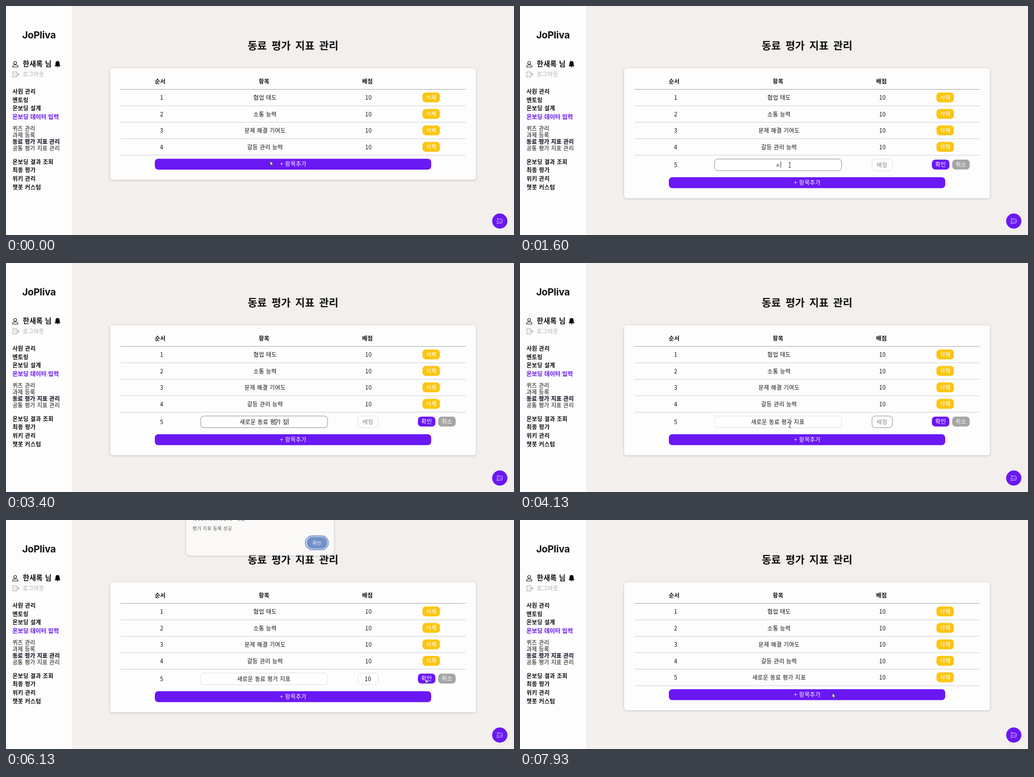
Animation of 1000 by 452 pixels, one loop 8 s. Source, as an HTML page:

```html
<!DOCTYPE html>
<html lang="ko">
<head>
<meta charset="utf-8">
<style>
  html, body { margin: 0; width: 100%; height: 100%; overflow: hidden; background: #f2efec; }
  svg { display: block; width: 1000px; height: 452px; }
  text { font: 11.2px "Noto Sans CJK KR", "Noto Sans CJK", sans-serif; letter-spacing: .3px; fill: #111; }
  .mid { text-anchor: middle; }
  .bold { font-weight: 700; }
  .sub { font-size: 11px; }
  .title { font-size: 20.5px; letter-spacing: 0; word-spacing: 3.5px; }
  .logo { font: 700 19px Inter, sans-serif; letter-spacing: -.2px; }
  .user { font-size: 14px; }
  .purple { fill: #6a18f4; }
  .white { fill: #fff; }
  .gray { fill: #888; }
  .pale { fill: #aaa; }
  .small { font-size: 9.4px; letter-spacing: .1px; }
  .card { filter: drop-shadow(0 1.5px 2px #0003); }
  .line { fill: none; stroke: #222; stroke-width: 1.2; stroke-linejoin: round; stroke-linecap: round; }
</style>
</head>
<body>
<svg id="stage" viewBox="0 0 1000 452"></svg>
<script>
const LOOP = 8000;
const ADD = 250, FOCUS = 600, TYPE = 1545, KEY = 83.5, TAB = 4000;
const OPEN = 6050, CLOSE = 7140, SAVE = 7250;

// Successive states of the Korean input method, one per key press
const typed = (() => {
  const words = [
    ['ㅅ', '새', '샐', '새로', '새롱', '새로우', '새로운'],
    ['ㄷ', '도', '동', '동ㄹ', '동료'],
    ['ㅍ', '펴', '평', '평ㄱ', '평가'],
    ['ㅈ', '지', '짚', '지표']
  ];
  const states = [''];
  let done = '';
  for (const steps of words) {
    if (done) states.push(done += '\u00a0');
    for (const step of steps) states.push(done + step);
    done += steps.at(-1);
  }
  return states;
})();

// Pointer stops: time, x, y
const stops = [
  [0, 520, 306], [350, 520, 306], [600, 523, 320], [1000, 523, 320],
  [1400, 531, 314], [3600, 531, 314], [4200, 531, 320], [5050, 531, 320],
  [5300, 640, 350], [5650, 826, 314], [6150, 826, 314], [6750, 621, 44],
  [7170, 621, 44], [7700, 615, 342], [LOOP, 615, 342]
];

const text = (x, y, s, cls = '', attrs = '') =>
  `<text x="${x}" y="${y + 4.2}" class="${cls}" ${attrs}>${s}</text>`;
const box = (x, y, w, h, r, fill, attrs = '') =>
  `<rect x="${x}" y="${y}" width="${w}" height="${h}" rx="${r}" fill="${fill}" ${attrs}/>`;
const rule = (y, color) => box(225, y, 680, 1, 0, color);
const button = (x, y, label, fill) =>
  box(x - .2, y - 9.7, 34.4, 19.4, 6.5, fill) + text(x + 17, y, label, 'mid white');
const row = (i, name) => {
  const y = 181 + 32.5 * i;
  return text(306.5, y, i + 1, 'mid') + text(510, y, name, 'mid') + text(713.5, y, 10, 'mid') +
    button(820, y - .5, '삭제', '#fdc50f') + rule(y + 15.5, '#cfcfcf');
};
const input = (id, x, w) =>
  box(x + .5, 302, w, 23, 6.5, '#fff', `id="${id}Box"`) +
  text(x + w / 2, 313.5, '', 'mid', `id="${id}"`);

const menu = [
  [169, '사원 관리', 'bold'], [186, '멘토링', 'bold'], [202, '온보딩 설계', 'bold'],
  [219, '온보딩 데이터 입력', 'bold purple'], [241.5, '퀴즈 관리', 'sub'], [254.5, '과제 등록', 'sub'],
  [267.5, '동료 평가 지표 관리', 'bold sub'], [280.5, '공통 평가 지표 관리', 'sub'],
  [308, '온보딩 결과 조회', 'bold'], [324, '최종 평가', 'bold'],
  [340.5, '위키 관리', 'bold'], [357.5, '챗봇 커스텀', 'bold']
];

const sidebar =
  box(0, 0, 130, 452, 0, '#fefdfe') +
  text(65, 59.5, 'JoPliva', 'mid logo') +
  `<g class="line"><circle cx="18" cy="112.3" r="2.8"/><path d="M13 120.5q0-4 3.5-4h3.5q3.5 0 3.5 4z"/></g>` +
  text(33, 115, '한새록 님', 'bold user') +
  `<path d="M101.5 108.5c-3.5 0-4 3-4 5.5s-.6 3.8-1.8 5h11.6c-1.2-1.2-1.8-2.5-1.8-5s-.5-5.5-4-5.5zM99.8 119.8a1.8 1.8 0 0 0 3.5 0z"/>` +
  `<path class="line" style="stroke:#aaa" d="M21 132.5V130.2H13.5V139.8H21V137.5M17.5 135H25.5M23 132.5L25.5 135L23 137.5"/>` +
  text(33, 135, '로그아웃', 'pale') +
  box(12, 213, 92, 12, 0, '#f1edfb') + box(12, 262, 92, 11.5, 0, '#eeedf8') +
  menu.map(([y, label, cls]) => text(12.7, y, label, cls)).join('');

const table =
  box(205, 123, 720, 220, 5, '#fefdfe', 'id="card" class="card"') +
  text(303.5, 149, '순서', 'mid bold') + text(508, 149, '항목', 'mid bold') +
  text(711.5, 149, '배점', 'mid bold') + rule(164, '#a9a9a9') +
  ['협업 태도', '소통 능력', '문제 해결 기여도', '갈등 관리 능력'].map((n, i) => row(i, n)).join('') +
  `<g id="saved">${row(4, typed.at(-1))}</g>` +
  `<g id="form">${text(306.5, 314, 5, 'mid')}${input('item', 382.5, 250)}${input('score', 692.5, 40)}
    ${button(811, 313, '확인', '#6a18f4')}${button(851, 313, '취소', '#a5a5a6')}
    ${box(0, 307, 1, 12, 0, '#222', 'id="caret"')}</g>` +
  `<g id="add">${box(293, 0, 544, 21.5, 6.5, '#6a18f4')}${text(565.5, 10.7, '+ 항목추가', 'mid white')}</g>`;

const chat =
  `<circle cx="972" cy="424.5" r="15" fill="#6a18f4"/>
  <g class="line" style="stroke:#fff;stroke-width:.8"><path d="M970 420.5h4.5q2.5 0 2.5 2.5v3q0 2.5-2.5 2.5h-5l-2.5 1.5v-6.5"/>
  <circle cx="968" cy="420.5" r="1"/><path stroke-width="1.3" d="M969.5 425h.01M972 425h.01M974.5 425h.01"/></g>`;

const dialog =
  `<g id="dialog">${box(354, -40, 292, 110.5, 8, '#fff', 'class="card" stroke="#bbb" stroke-width=".6"')}
  ${text(367, -3.5, 'localhost:5173 내용:')}
  ${text(367, 16, '평가 지표 등록 성공', 'small')}
  ${box(589.5, 31.5, 45, 27, 13.5, '#fff', 'stroke="#2257b4" stroke-width="1.8"')}
  ${box(592, 33.5, 40.5, 23, 11.5, '#2257b4')}
  ${text(612, 44.5, '확인', 'mid white small')}</g>`;

const pointer =
  `<g id="pointer"><path id="arrow" d="M0 0V8.5L2 6.8L3.2 9.6L4.6 9L3.4 6.3H6z" fill="#fff" stroke="#222" stroke-width=".7"/>
  <path id="beam" class="line" style="stroke-width:.9" d="M-2-5H-.5L0-4.5L.5-5H2M0-4.5V4.5M-2 5H-.5L0 4.5L.5 5H2"/></g>`;

const stage = document.getElementById('stage');
stage.innerHTML = box(0, 0, 1000, 452, 0, '#f2efec') + sidebar +
  text(565, 82, '동료 평가 지표 관리', 'mid bold title') +
  table + chat + dialog + pointer;

const $ = id => document.getElementById(id);
const show = (id, on) => { $(id).style.display = on ? '' : 'none'; };

function fill(id, value, placeholder, focused) {
  $(id).textContent = value || placeholder;
  $(id).setAttribute('class', value ? 'mid' : 'mid gray');
  $(id + 'Box').setAttribute('stroke', focused ? '#8d8d8d' : '#dedee0');
}

function pointerAt(t) {
  const i = stops.findIndex(s => s[0] > t);
  const [t0, x0, y0] = stops[i - 1], [t1, x1, y1] = stops[i];
  const p = (t - t0) / (t1 - t0), e = p * p * (3 - 2 * p);
  return [x0 + (x1 - x0) * e, y0 + (y1 - y0) * e];
}

function render(t) {
  const editing = t >= ADD && t < SAVE, saved = t >= SAVE;
  show('form', editing);
  show('saved', saved);
  $('card').setAttribute('height', editing ? 256.5 : saved ? 252.5 : 220);
  $('add').setAttribute('transform', `translate(0 ${editing ? 338 : saved ? 334 : 301.5})`);

  const keys = Math.floor((t - TYPE) / KEY) + 1;
  const name = typed[Math.max(0, Math.min(keys, typed.length - 1))];
  const score = t < TAB + 250 ? '' : t < TAB + 400 ? '1' : '10';
  const onItem = t >= FOCUS && t < TAB, onScore = t >= TAB && t < 5800;
  fill('item', name, '항목명', onItem);
  fill('score', score, '배점', onScore);

  const field = onItem ? 'item' : 'score', value = onItem ? name : score;
  const width = editing && value ? $(field).getComputedTextLength() : 0;
  const typing = t >= TYPE && t < TYPE + KEY * typed.length;
  show('caret', (onItem || onScore) && (typing || (t - FOCUS) % 1000 < 500 && t < 4900));
  $('caret').setAttribute('x', (onItem ? 507.5 : 712.5) + width / 2);

  show('dialog', t >= OPEN && t < CLOSE);
  $('dialog').style.opacity = Math.min(1, (t - OPEN) / 130);

  const [x, y] = pointerAt(t);
  const overField = editing && y > 302 && y < 325 && (x > 383 && x < 633 || x > 693 && x < 733);
  $('pointer').setAttribute('transform', `translate(${x} ${y})`);
  show('beam', overField);
  show('arrow', !overField);
}

function tick() {
  render(performance.now() % LOOP);
  requestAnimationFrame(tick);
}
tick();
</script>
</body>
</html>
```
